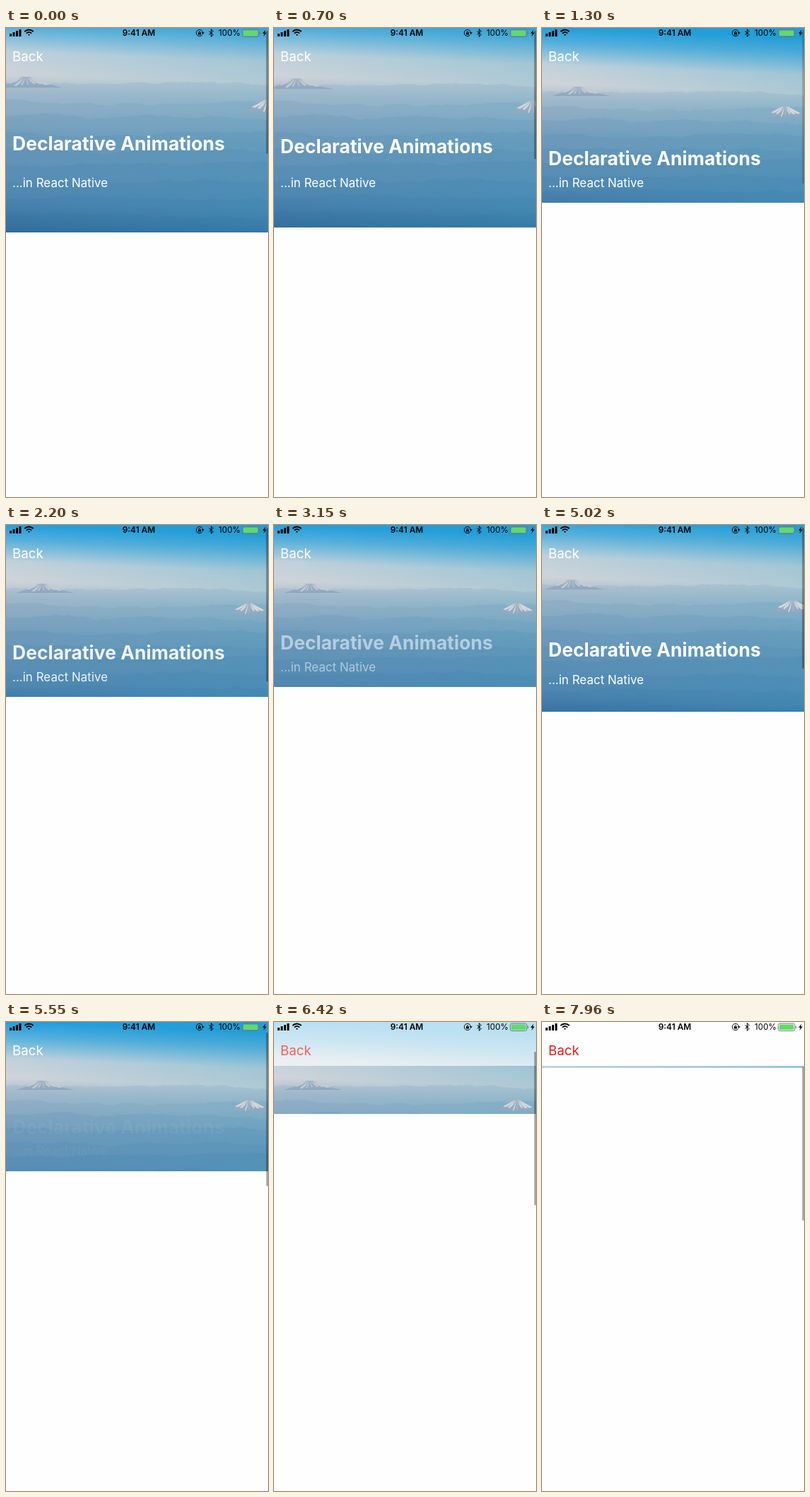
Animation of 371x663 px, one loop 8 s. Source, as an HTML page with a canvas:

```html
<!DOCTYPE html>
<html lang="en">
<head>
<meta charset="utf-8">
<title>Collapsing header</title>
<style>
  html, body { margin: 0; width: 100%; height: 100%; overflow: hidden; background: #fefefe; }
  canvas { display: block; width: 371px; height: 663px; }
</style>
</head>
<body>
<canvas id="stage" width="371" height="663"></canvas>
<script>
const W = 371, H = 663, LOOP = 8000;
const REST = 247, NAV = 62;
const ctx = document.getElementById('stage').getContext('2d');

const clamp = v => Math.min(1, Math.max(0, v));
const mix = (a, b, p) => a + (b - a) * p;
const easeIn = power => u => u ** power;
const easeOut = power => u => 1 - (1 - u) ** power;
const smooth = u => u * u * (3 - 2 * u);

// Moves of the header's bottom edge, which begins at y = 289
const START_Y = 289;
const moves = [
  { from: 0, until: 400, to: 327, ease: easeOut(2) },
  { from: 400, until: 1280, to: REST, ease: easeOut(2) },
  { from: 1800, until: 3130, to: 229, ease: smooth },
  { from: 4010, until: 4350, to: 296, ease: easeOut(2) },
  { from: 4350, until: 5550, to: 211, ease: easeIn(1.67) },
  { from: 5550, until: LOOP, to: 65, ease: easeOut(1.85) }
];

const headerAt = t => moves.reduce(
  (y, m) => mix(y, m.to, m.ease(clamp((t - m.from) / (m.until - m.from)))), START_Y);

// Quick fade in, slow fade out
const pulse = (t, on, off) => Math.min(clamp((t - on) / 40), clamp((off - t) / 360));
const scrollbarAlpha = t => pulse(t, -40, 1500) + pulse(t, 1800, 3140) + pulse(t, 3550, LOOP + 400);

function randomFrom(seed) {
  return () => {
    seed = (seed * 16807) % 2147483647;
    return seed / 2147483647;
  };
}

function gradient(x0, y0, x1, y1, stops) {
  const g = ctx.createLinearGradient(x0, y0, x1, y1);
  for (const [p, color] of stops) g.addColorStop(p, color);
  return g;
}

function polygon(points, color) {
  ctx.fillStyle = color;
  ctx.beginPath();
  points.forEach(([x, y]) => ctx.lineTo(x, y));
  ctx.fill();
}

function text(str, x, y, font, color, align = 'left') {
  ctx.font = font + ' Inter, sans-serif';
  ctx.fillStyle = color;
  ctx.textAlign = align;
  ctx.fillText(str, x, y);
}

const sky = gradient(0, 0, -12, 300, [
  [0, '#259fdc'], [0.07, '#58b0dc'], [0.17, '#c0d1db'], [0.26, '#d0d4d9'],
  [0.34, '#a6bccd'], [0.5, '#769fbe'], [0.76, '#4f88b1'], [0.9, '#306a9a'], [1, '#265a88']
]);
const tealTint = gradient(0, 0, W, 0, [[0, 'rgba(30,150,190,0)'], [1, 'rgba(30,150,190,.2)']]);

function ridge(index) {
  const random = randomFrom(index * 977 + 31);
  const base = 92 + index * 20;
  const depth = 30;
  const points = [[0, base + depth]];
  let y = base;
  for (let x = 0; x <= W + 4; x += 4) {
    y += (random() - 0.5) * 2.6 + (base - y) * 0.04;
    points.push([x, y]);
  }
  points.push([W + 4, base + depth]);
  polygon(points, gradient(0, base - 5, 0, base + depth, [
    [0, 'rgba(45,105,155,.1)'], [1, 'rgba(45,105,155,0)']
  ]));
}

function mountain(peakX, peakY, left, right, height, snow) {
  const foot = peakY + height;
  const random = randomFrom(peakX);
  ctx.fillStyle = gradient(0, peakY, 0, foot, [[0, '#a3b4c5'], [1, '#8ba8c0']]);
  ctx.beginPath();
  ctx.moveTo(peakX - left, foot);
  ctx.quadraticCurveTo(peakX - left * 0.4, peakY + height * 0.5, peakX - 5, peakY);
  ctx.lineTo(peakX + 5, peakY);
  ctx.quadraticCurveTo(peakX + right * 0.4, peakY + height * 0.6, peakX + right, foot);
  ctx.fill();

  // Snow gullies fanning out from the summit
  for (let i = 0; i < 7; i++) {
    const side = mix(-left, right, (i + 0.5) / 7) * 0.75;
    const drop = height * mix(0.55, 0.9, random());
    polygon([[peakX + side * 0.15, peakY + 0.5], [peakX + side, peakY + drop],
      [peakX + side * 0.8, peakY + drop + 1], [peakX + side * 0.45, peakY + drop * 0.7]], snow);
  }
}

function photo(header) {
  const over = Math.max(0, header - REST);
  const scale = 1 + over / REST;
  ctx.save();
  ctx.translate(W / 2, -over * 2 / 3);
  ctx.scale(scale, scale);
  ctx.translate(-W / 2, 0);
  ctx.fillStyle = sky;
  ctx.fillRect(0, 0, W, 330);
  ctx.fillStyle = tealTint;
  ctx.fillRect(0, 0, W, 330);
  for (let i = 0; i < 9; i++) ridge(i);
  mountain(51, 83, 37, 46, 13, '#c3cad2');
  mountain(344, 110, 31, 34, 17, '#d4d8dc');
  ctx.restore();
}

function strokeArc(x, y, r, start, end) {
  ctx.beginPath();
  ctx.arc(x, y, r, start, end);
  ctx.stroke();
}

function roundBox(x, y, w, h, r) {
  ctx.beginPath();
  ctx.roundRect(x, y, w, h, r);
}

function statusBar() {
  ctx.fillStyle = ctx.strokeStyle = '#000';
  for (let i = 0; i < 4; i++) {
    const h = 4 + i * 2;
    ctx.fillRect(5 + i * 4.5, 12 - h, 3, h);
  }

  // Wi-Fi
  ctx.lineWidth = 1.9;
  for (const r of [1.2, 5, 8.5]) strokeArc(32.5, 11, r, -Math.PI * 0.76, -Math.PI * 0.24);

  text('9:41 AM', 188, 11, '600 11.9px', '#000', 'center');

  // Rotation lock
  ctx.lineWidth = 1;
  strokeArc(274, 7, 4.6, 0.5, Math.PI * 2 - 0.1);
  polygon([[276.6, 6.2], [281, 6.2], [278.8, 8.8]], '#000');
  ctx.fillRect(272, 6.5, 4, 3);
  strokeArc(274, 6.4, 1.3, Math.PI, 0);

  // Bluetooth
  ctx.stroke(new Path2D('M287.5 4.5l6 5-3 2.8V1.7l3 2.8-6 5'));

  text('100%', 301, 11, '400 11.7px', '#000');

  // Battery
  ctx.strokeStyle = ctx.fillStyle = '#707a80';
  roundBox(334.5, 2, 23.5, 10.5, 2.5);
  ctx.stroke();
  ctx.fillRect(359, 5.5, 1.2, 3.5);
  ctx.fillStyle = '#62da68';
  roundBox(336, 3.5, 20.5, 7.5, 1);
  ctx.fill();
  ctx.fillStyle = '#000';
  ctx.fill(new Path2D('M367.6 2.5l-4.3 5.3h2.6l-1.3 4.2 4.4-5.6h-2.6z'));
}

function scrollbar(header, alpha) {
  const stretched = header > REST;
  const bottom = 220 + (REST - header) / (stretched ? 1 : 3);
  const top = stretched ? 4 : bottom - 217;
  ctx.fillStyle = `rgba(0,0,0,${0.35 * alpha})`;
  roundBox(368.5, top, 2.5, bottom - top, 1.2);
  ctx.fill();
}

function draw(t) {
  const header = headerAt(t);
  const over = Math.max(0, header - REST);
  const scrolled = Math.max(0, REST - header);
  const navAlpha = clamp((185 - header) / 80);

  ctx.fillStyle = '#fefefe';
  ctx.fillRect(0, 0, W, H);

  ctx.save();
  ctx.beginPath();
  ctx.rect(0, 0, W, Math.round(header));
  ctx.clip();
  photo(header);
  ctx.globalAlpha = clamp(1 - scrolled / 38);
  text('Declarative Animations', 9, 194 - over / 2 - scrolled, '700 26.5px', '#fff');
  text('...in React Native', 9, 224.6 - scrolled, '400 17px', '#fff');
  ctx.restore();

  ctx.fillStyle = `rgba(254,254,254,${navAlpha})`;
  ctx.fillRect(0, 0, W, NAV);
  const tint = [228, 30, 20].map(c => Math.round(mix(255, c, navAlpha)));
  text('Back', 9, 47, '400 18.7px', `rgb(${tint})`);
  statusBar();
  scrollbar(header, scrollbarAlpha(t));
}

function tick() {
  draw(performance.now() % LOOP);
  requestAnimationFrame(tick);
}
tick();
</script>
</body>
</html>
```
